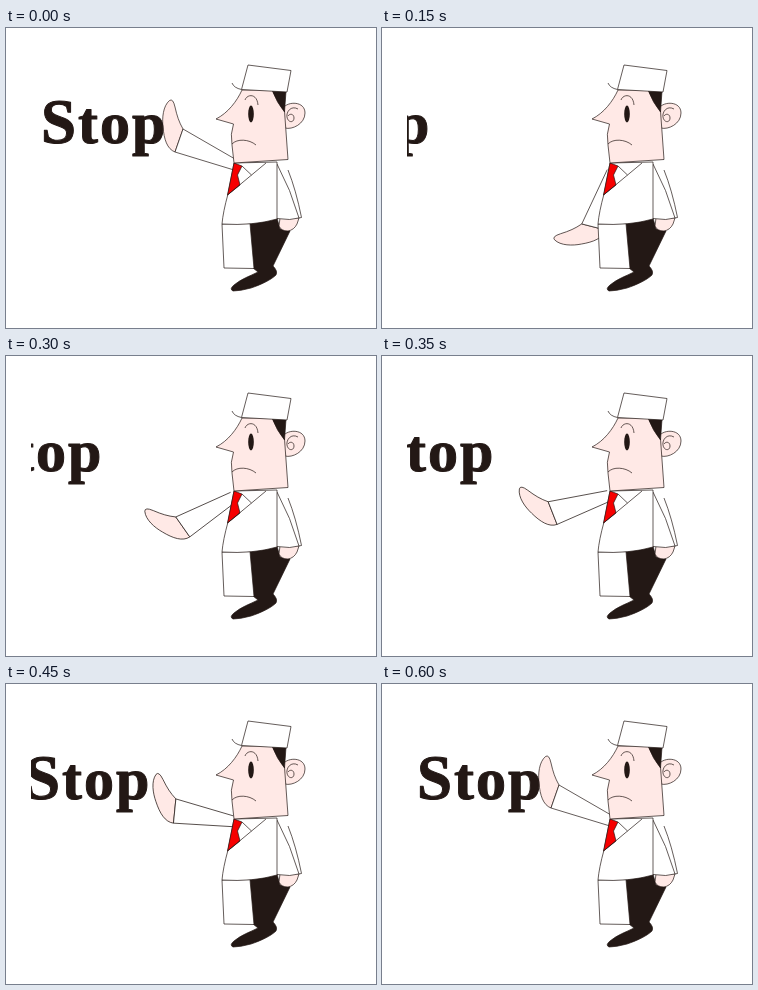
Animation of 370x300 px, one loop 1000 ms. Source, as an HTML page with a canvas:

```html
<!DOCTYPE html>
<html lang="en">
<head>
<meta charset="utf-8">
<title>Stop</title>
<style>
html, body { margin: 0; width: 100%; height: 100%; overflow: hidden; background: #fff; }
canvas { display: block; }
</style>
</head>
<body>
<canvas id="stage" width="370" height="300"></canvas>
<script>
const ctx = document.getElementById('stage').getContext('2d');
const INK = '#231815', SKIN = '#ffe9e6', RED = '#f60000', WHITE = '#fff';
const LOOP = 1000, STEP = 50, ARRIVAL = 10;
const SHOULDER = [232, 138];
const TURN = 13.55 * Math.PI / 180;  // arm rotation per step
const SLIDE = 16;                    // text travel per step
const TEXT_EDGE = 25;

function draw(d, fill, line = true) {
  const p = new Path2D(d);
  if (fill) {
    ctx.fillStyle = fill;
    ctx.fill(p);
  }
  if (line) ctx.stroke(p);
}

function drawArm(lag) {
  ctx.save();
  ctx.translate(...SHOULDER);
  ctx.rotate(-lag * TURN);
  ctx.translate(-SHOULDER[0], -SHOULDER[1]);
  draw('M177 101 C173 94 171 88 169 79 Q167 70 163.5 72.5 C157 78 156 90 157 99 C158 111 161 121 169 124 Z', SKIN);
  draw('M229 131 L177 101 L169 124 L228 142', WHITE);
  ctx.restore();
}

function drawLegs() {
  draw('M243 195 L271 190 L274 201 L284 203 L267 238 Q272 243 270 247 C265 252 254 257 245 260 ' +
       'Q234 263 227 263 Q223 261 228 257 C235 251 244 248 252 244 L247 240 Z', INK);
  draw('M216 196 L244 195.5 L248 240.5 L218 240 Z', WHITE);
}

function drawCoat() {
  draw('M274 190 L273 198 Q275 203 282 203 Q288 202 291 196 L293 190 Z', SKIN);
  draw('M271 135 L282 142 L295.5 189.5 Q284 193 271 190.5 Z', WHITE, false);
  draw('M282 142 Q290 162 295.5 189.5 Q284 193 271 190.5 M271 136 Q285 162 293 190');
  draw('M228 135 L271 134 L271 191 Q247 198 216 196 Q217 184 222 166 Z', WHITE);
  draw('M228 135 L236 138 L231.5 147 L234 157 L221.5 167 Z', RED);
  draw('M236 138 L245.5 147 M260 135 L221.5 167');
}

function drawHead() {
  draw('M277 80 C282 73 299 73 299 85 C299 96 286 102 279 100 Z', SKIN);
  draw('M292 81 C285 77 280 84 281 89 C282 95 288 95 288 90 C288 86 284 85 282 88');
  draw('M236 62 C231 73 222 85 210 91 L227.5 96 Q224 106 226 117 L228 135 ' +
       'L282 131.5 L278.5 83 L266 62 Z', SKIN);
  draw('M266 62 L280 63 L278.5 84 Q271 75 266 62 Z', INK);
  draw('M242 37 L285 42.5 L281 64 L235.5 61.5 Z', WHITE);
  draw('M226 55 Q228 60 235.5 61.5 M239 72 C241 66 251 65 252 77 M226 116 C231 110.5 243 111 250 117');
  ctx.fillStyle = INK;
  ctx.beginPath();
  ctx.ellipse(245, 86, 2.8, 8.5, 0, 0, Math.PI * 2);
  ctx.fill();
}

// Draws one run of text and returns where the next one begins.
function drawRun(text, size, x) {
  ctx.font = `bold ${size}px "Liberation Serif", serif`;
  ctx.fillText(text, x, 115);
  ctx.strokeText(text, x, 115);
  return x + ctx.measureText(text).width;
}

function drawText(lag) {
  ctx.save();
  ctx.beginPath();
  ctx.rect(TEXT_EDGE, 0, 370, 300);
  ctx.clip();
  ctx.fillStyle = INK;
  ctx.lineWidth = 1;
  ctx.letterSpacing = '2px';
  const next = drawRun('S', 63, 35 - lag * SLIDE);
  drawRun('top', 60, next);
  ctx.restore();
}

function render(now) {
  const step = Math.floor(now % LOOP / STEP);
  // The loop opens on the finished pose, then jumps back and replays.
  const lag = step === 0 ? 0 : Math.max(0, ARRIVAL - step);
  ctx.fillStyle = WHITE;
  ctx.fillRect(0, 0, 370, 300);
  ctx.strokeStyle = INK;
  ctx.lineWidth = 0.7;
  ctx.lineJoin = 'round';
  drawArm(lag);
  drawLegs();
  drawCoat();
  drawHead();
  drawText(lag);
}

const start = performance.now();
function tick() {
  render(performance.now() - start);
  requestAnimationFrame(tick);
}
tick();
</script>
</body>
</html>
```
